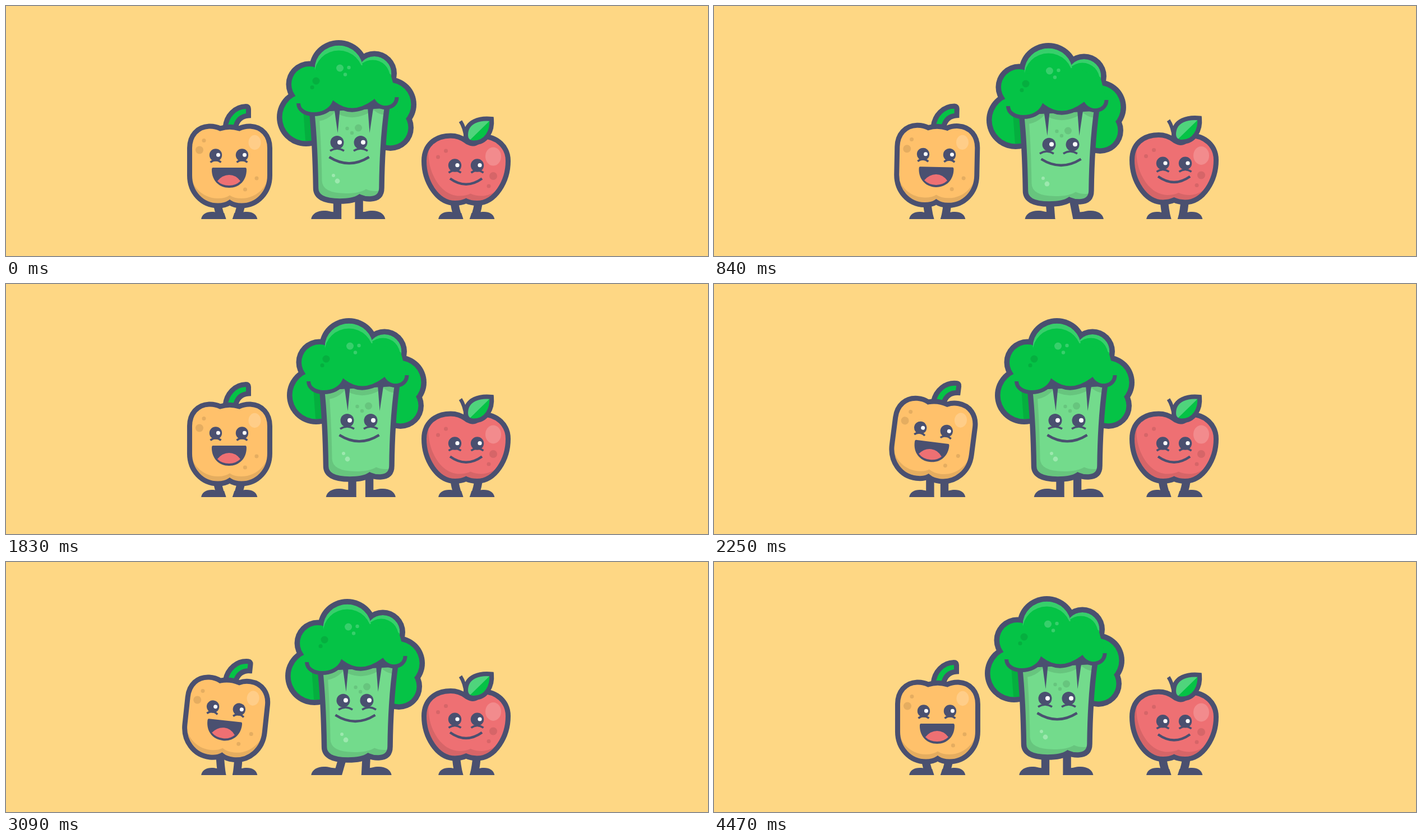
Animation, 1252 px wide and 447 px high, one loop 4.5 s. Source, as an HTML page:

```html
<!DOCTYPE html>
<html lang="en">
<head>
<meta charset="utf-8">
<title>Dancing vegetables</title>
<style>
  html, body { margin: 0; width: 100%; height: 100%; overflow: hidden; background: #fed784; }
  svg { display: block; width: 100%; height: 100%; }
</style>
</head>
<body>
<svg id="stage" viewBox="0 0 1252 447"></svg>
<script>
const INK = '#4a5070', GREEN = '#05c346', LEAF_SHADE = '#05af3f', GLOW = '#37cf6b',
      MINT = '#73db8c', MINT_SHADE = '#67c57e', ORANGE = '#ffc16b', ORANGE_SHADE = '#e5ad60',
      RED = '#ee7073', RED_SHADE = '#d66568';
const GROUND = 381, STEP = 30, LOOP = 4500;

// ---- drawing helpers ----
const path = (d, fill, extra = '') => `<path d="${d}" fill="${fill}" ${extra}/>`;
const line = (d, w, extra = '') => path(d, 'none', `stroke="${INK}" stroke-width="${w}" ${extra}`);
const oval = (x, y, rx, ry, fill) => `<ellipse cx="${x}" cy="${y}" rx="${rx}" ry="${ry}" fill="${fill}"/>`;
const dots = (fill, ...list) => list.map(([x, y, r]) => oval(x, y, r, r, fill)).join('');
const group = (id, inner) => `<g id="${id}">${inner}</g>`;

// Body with a shaded edge: a lighter copy is shifted inside the clipped outline.
const shaded = (id, d, light, shade, dx, dy, details = '') => `
  <clipPath id="${id}"><path d="${d}"/></clipPath>
  <g clip-path="url(#${id})">${path(d, shade)}${path(d, light, `transform="translate(${dx} ${dy})"`)}${details}</g>`;

const eyes = (xs, y, r, shine) => xs.map(x =>
  oval(x, y, r, r, INK) + oval(x + 4.5, y - .3, shine, shine, '#fff')).join('');

const cheeks = (xs, y, w) => xs.map(x =>
  line(`M${x - w},${y}Q${x},${y - 8} ${x + w},${y}`, 3.5)).join('');

// dir is the direction of the toe; (0,0) is the ankle on the ground.
function foot(id, dir, len, high) {
  const px = k => -dir * 7.2 + dir * len * k;
  return `<path id="${id}" fill="${INK}" d="M${px(1)},0C${px(.97)},${-high * .66} ${px(.79)},${-high} ${px(.58)},${-high}
    C${px(.4)},${-high} ${px(.34)},${-high * .84} ${px(.22)},${-high * .84}H${px(.08)}L${px(0)},0Z"/>`;
}
const legs = (id, len, high) => ['L', 'R'].map((s, i) =>
  `<path id="${id}Leg${s}" fill="none" stroke="${INK}" stroke-width="14.4"/>` +
  foot(id + 'Foot' + s, i ? 1 : -1, len, high)).join('');

// ---- pepper ----
const pepperBody = `M382,219Q373,214.5 362,215C341,216 327.5,232 327.5,254V303C327.5,333 349,357 378,357
  Q391,357 399,351.5Q407,357 420,357C449,357 470.5,333 470.5,303V254C470.5,232 457,216 436,215
  Q425,214.5 416,219Q399,213.5 382,219Z`;
const pepper = group('pepper',
  path('M391,217C393,196 408,180 428,179.5Q432.5,179.5 432.5,184V196C420,197 412,204 409.5,217', GREEN,
    `stroke="${INK}" stroke-width="9"`) +
  shaded('pepperClip', pepperBody, ORANGE, ORANGE_SHADE, 0, -13) +
  line(pepperBody, 9) +
  dots(ORANGE_SHADE, [345, 257.5, 7], [353, 240.5, 3.5], [447, 308, 3.5], [426.5, 328, 3.5]) +
  oval(443.5, 244, 11, 13.2, '#ffcd88') +
  eyes([374, 421], 266.5, 11.2, 3.5) + cheeks([374, 421], 279.5, 9.5) +
  path('M369,289H427Q429,289 429,293C429,312 416,325 398,325C380,325 367,312 367,293Q367,289 369,289Z', INK) +
  path('M377,313Q386,302 398,302Q410,302 418,313Q410,321 398,321Q385,321 377,313Z', RED));

// ---- broccoli ----
const scallops = 'M521.5,174C522,199.5 572,200.5 584.5,174Q618,199.5 656.5,171C670,189 697,183 697,163';
const stalk = `M545,185Q551,240 552.5,325Q552,349 595,349Q620,349 631,341.5Q640,345.5 650,345
  Q670,344 670,325Q671,240 680,178Z`;
const lobes = [[535, 199, 52, 52], [683, 176, 49, 49], [685.5, 217.5, 41.5, 41.5],
  [541, 140, 41.5, 41.5], [657, 120.5, 40, 40], [593.5, 112, 52.5, 51]];
const lobe = (i, inset, fill, dx = 0, dy = 0) => {
  const [x, y, rx, ry] = lobes[i];
  return oval(x + dx, y + dy, rx - inset, ry - inset, fill);
};
const broccoli = group('broccoli',
  lobes.map((_, i) => lobe(i, 0, INK)).join('') +
  [0, 1, 2, 3].map(i => lobe(i, 9.5, GREEN)).join('') +
  `<clipPath id="bumpR">${lobe(4, 9.5, GREEN)}</clipPath><clipPath id="bumpM">${lobe(5, 9.5, GREEN)}</clipPath>` +
  `<g clip-path="url(#bumpR)">${lobe(4, 9.5, GLOW)}${lobe(4, 9, GREEN, -3, 7)}</g>` +
  `<g clip-path="url(#bumpM)">${lobe(5, 9.5, GLOW)}${lobe(5, 9.5, GREEN, 0, 9)}</g>` +
  path('M530,185H550V241H534Z', LEAF_SHADE) +
  shaded('stalkClip', stalk, MINT, MINT_SHADE, 11, -14,
    path(scallops, 'none', `stroke="${MINT_SHADE}" stroke-width="12" transform="translate(0 7)"`)) +
  line(stalk, 9.5) +
  path('M585,180H596L591.5,227ZM645,180L656,176L648.5,227Z', INK) +
  path(scallops + 'L686,122L640,105L600,112L548,116L512,150Z', GREEN) +
  line(scallops, 7) +
  dots(GLOW, [595.5, 111, 6.5], [611.5, 110, 3.2], [605, 122.5, 3.2]) +
  dots(LEAF_SHADE, [553, 134, 6.5], [546, 145.5, 3.5]) +
  dots(MINT_SHADE, [628.5, 218, 6.5], [608.5, 219, 3.2], [617, 227, 3.2]) +
  dots('#9ce8ae', [591, 313, 4.4], [584, 303, 3]) +
  group('broccoliEyes', eyes([590.5, 632.5], 244, 12, 4)) +
  cheeks([590.5, 632.5], 259, 12.5) +
  group('broccoliMouth', line('M576.5,270Q612,292.5 647.5,270', 4.5)));

// ---- apple ----
const appleBody = `M820,241Q808,232 793,232C764,232 745.5,250 745.5,277C745.5,313 768,352.5 801,352.5
  Q812,352.5 820.5,348.5Q829,352.5 840,352.5C873,352.5 895.5,313 895.5,277
  C895.5,252 876,233 849,233Q842,246 832,246Q825,245 820,241Z`;
const leaf = 'M866,202C846,200 820,205 820,231Q820,243 832,244.5C858,246 868,222 866,202Z';
const apple = group('apple',
  shaded('appleClip', appleBody, RED, RED_SHADE, 8, -13) +
  line(appleBody, 9) +
  line('M810.5,206Q818,217 820.5,237', 6.5) +
  path(leaf, GREEN) + path('M866,202C846,200 820,205 820,231Q820,239 825,242Z', '#4fd47c') + line(leaf, 8) +
  dots(RED_SHADE, [784.5, 259, 3.5], [770.5, 270, 3.5], [869, 304, 7], [861, 322, 3.5]) +
  oval(869, 269, 14, 16.5, '#f28b8d') +
  group('appleEyes', eyes([800.5, 840.5], 285, 11.7, 3.6)) +
  cheeks([800.5, 840.5], 298, 11) +
  group('appleMouth', line('M792,308.5Q820.5,329 849,308.5', 4.5)));

const stage = document.getElementById('stage');
stage.innerHTML = `<clipPath id="floor"><rect width="1252" height="${GROUND}"/></clipPath>
  <g clip-path="url(#floor)">${legs('pepper', 44.5, 13)}${legs('broccoli', 54, 15)}${legs('apple', 44.5, 13)}</g>
  ${pepper}${broccoli}${apple}`;

// ---- motion ----
const $ = id => document.getElementById(id);
const move = (id, x, y) => $(id).setAttribute('transform', `translate(${x} ${y})`);

// Steep ease in and out; u counts steps, each move takes five.
function ease(u) {
  const k = Math.min(1, Math.max(0, u / 5));
  return k < .5 ? 16 * k ** 5 : 1 - 16 * (1 - k) ** 5;
}
const LAG = .38; // faces and feet trail the body

function setLeg(id, side, d, footX) {
  $(id + 'Leg' + side).setAttribute('d', d);
  move(id + 'Foot' + side, footX, GROUND);
}

// Knees bow outwards while the body is low.
function bendLegs(id, middle, rise) {
  const bow = 10 * (1 - rise);
  [['L', -1], ['R', 1]].forEach(([side, s]) => {
    const x = middle + s * 12.8;
    setLeg(id, side, `M${x + s * bow},342Q${x + s * bow * .75},366 ${x},383`, x);
  });
}

function posePepper(n) {
  const u = n % 10, tilt = v => ease(v) - ease(v - 5), k = tilt(u);
  $('pepper').setAttribute('transform', `translate(${-8.5 * k} ${-6.5 * k}) rotate(${7.3 * k} 399 286)`);
  bendLegs('pepper', 398.2, tilt(u - LAG));
}

function poseBroccoli(n) {
  const u = n % 25, right = n % 50 < 25;
  const at = k => right ? k : 1 - k;
  const dip = v => 6 * (ease(v) - ease(v - 5));
  const body = at(ease(u)), face = at(ease(u - LAG)), late = at(ease(u - 5 - LAG));
  move('broccoli', 18 * body, dip(u));
  const fx = 18 * (face - body), fy = dip(u - LAG) - dip(u);
  move('broccoliEyes', fx, fy);
  move('broccoliMouth', fx, fy);
  // Each leg runs from a hip hidden in the stalk to its foot.
  const put = (side, x, span, k) =>
    setLeg('broccoli', side, `M${x + span * body},305L${x + span * k},383`, x + span * k);
  put('L', 591, 26.5, right ? late : face);
  put('R', 629.6, 18.5, right ? face : late);
}

function poseApple(n) {
  const u = n % 15, up = v => ease(v) - ease(v - 10);
  const body = up(u), trail = up(u - LAG), shift = -9.5 * (trail - body);
  move('apple', 0, -9.5 * body);
  move('appleEyes', 0, shift);
  move('appleMouth', 0, shift);
  bendLegs('apple', 821.2, trail);
}

function draw(ms) {
  const n = Math.floor(ms % LOOP / STEP);
  posePepper(n);
  poseBroccoli(n);
  poseApple(n);
}

const start = performance.now();
function tick() {
  draw(Math.max(0, performance.now() - start));
  requestAnimationFrame(tick);
}
tick();
</script>
</body>
</html>
```
